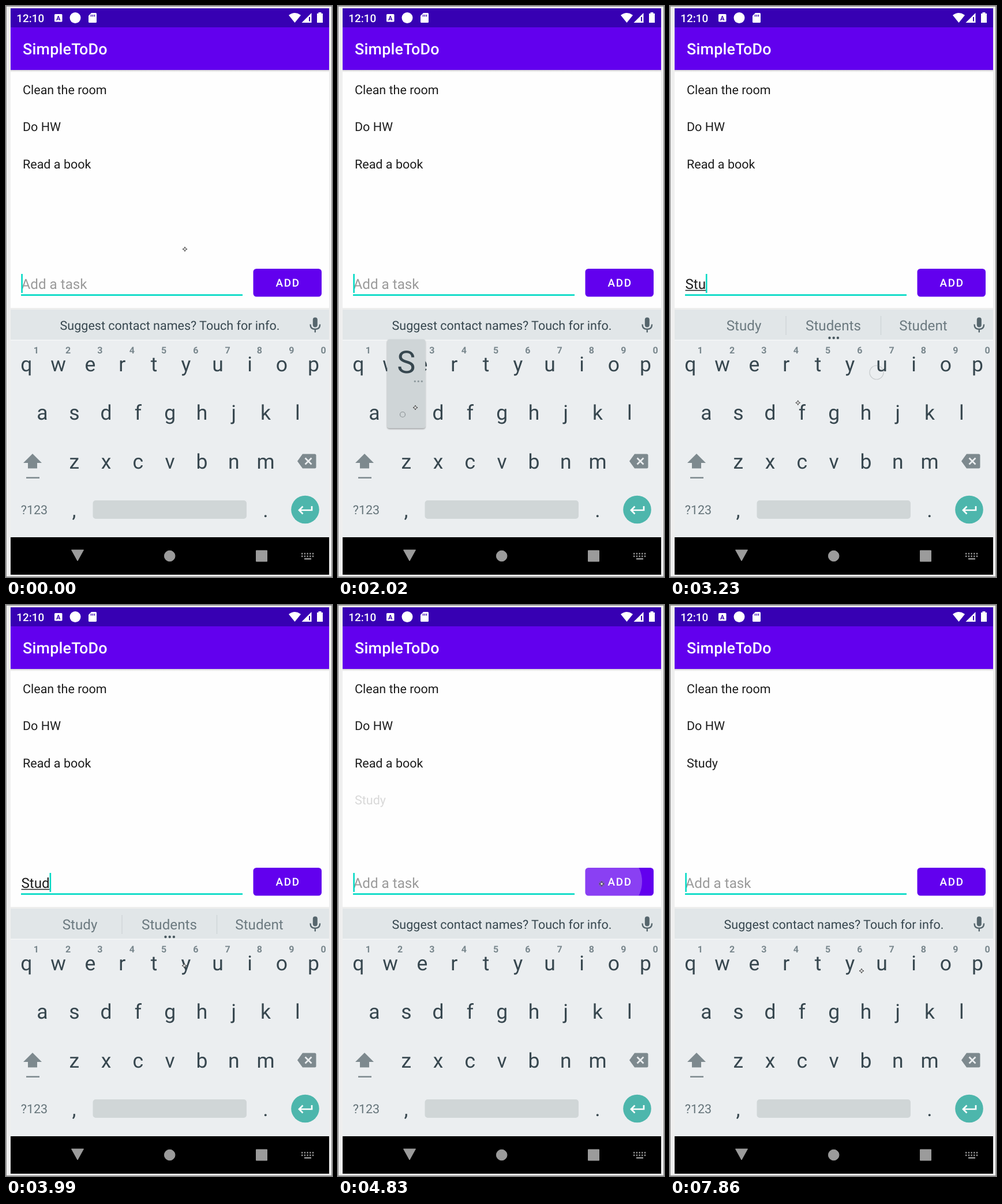
These frames come from a looping animation (565 px wide and 991 px high, 8000 ms). An HTML page:

```html
<!DOCTYPE html>
<html lang="en">
<head>
<meta charset="utf-8">
<title>To-do list</title>
<style>
  html, body { margin: 0; width: 100%; height: 100%; overflow: hidden; background: #efefef; }
  svg { display: block; width: 100vw; height: 100vh; font-family: Roboto, sans-serif; }
  text { text-rendering: geometricPrecision; }
  .mid { text-anchor: middle; }
  .item { font-size: 21.53px; fill: #1c1c1c; }
  .field { font-size: 24.2px; }
  .key { font-size: 35.5px; fill: #37474f; text-anchor: middle; }
  .hint { font-size: 16px; font-weight: 700; fill: #78868c; text-anchor: middle; }
  .word { font-size: 24.2px; fill: #6c7a80; text-anchor: middle; }
</style>
</head>
<body>
<svg viewBox="0 0 565 991">
  <defs>
    <linearGradient id="fade" x2="0" y2="1">
      <stop offset="0" stop-color="#d2d2d2"/><stop offset="1" stop-color="#fefefe"/>
    </linearGradient>
    <filter id="lift" x="-20%" y="-20%" width="140%" height="140%">
      <feDropShadow dx="0" dy="1.5" stdDeviation="1.3" flood-opacity=".4"/>
    </filter>
    <clipPath id="buttonClip"><rect x="428.5" y="456" width="118.5" height="48.5" rx="5.5"/></clipPath>
  </defs>

  <rect x=".5" y=".5" width="564" height="990" fill="#efefef" stroke="#8c8c8c"/>
  <rect x="8" y="4" width="552" height="983" fill="#fefefe"/>
  <rect x="8" y="4" width="552" height="33" fill="#3700b3"/>
  <rect x="8" y="37" width="552" height="74" fill="#6200ee"/>
  <rect x="8" y="111" width="552" height="4" fill="url(#fade)"/>

  <g fill="#fff">
    <text x="18.3" y="27.5" font-size="18.84" font-weight="500">12:10</text>
    <rect x="84" y="14" width="13.5" height="13.5" rx="1.5"/>
    <text class="mid" x="90.7" y="25" font-size="11" font-weight="700" fill="#3700b3">A</text>
    <circle cx="120" cy="20.5" r="9.5"/>
    <path d="M148 12h7.5q1.5 0 1.5 1.5v14q0 1.5-1.5 1.5h-11q-1.5 0-1.5-1.5v-10.5z"/>
    <path d="M147.5 15v3.5M150.5 15v3.5M153.5 15v3.5" stroke="#3700b3" stroke-width="1.4"/>
    <path d="M490 16Q500.5 8 511 16L500.5 29z"/>
    <path d="M512.5 29L529.5 12V29z"/>
    <path d="M526 19v7.5" stroke="#3700b3" stroke-width="2"/>
    <path d="M541.5 13v-2h5v2h2.5v16h-10v-16z"/>
    <text x="29" y="84" font-size="26.9" font-weight="500" letter-spacing=".2">SimpleToDo</text>
  </g>

  <g id="list"></g>

  <text id="hintText" class="field" x="26.5" y="491" fill="#9a9a9a">Add a task</text>
  <text id="typed" class="field" x="26.5" y="491" fill="#1c1c1c"></text>
  <rect id="underline" x="26.5" y="492.8" height="1.5" fill="#1c1c1c"/>
  <rect x="26" y="500.3" width="384" height="2.7" fill="#03dac5"/>
  <rect id="caret" y="465" width="2.6" height="33" fill="#03dac5"/>

  <rect x="428.5" y="456" width="118.5" height="48.5" rx="5.5" fill="#6200ee"/>
  <circle id="ripple" cx="473" cy="480" fill="#fff" clip-path="url(#buttonClip)"/>
  <text x="467.5" y="487.2" font-size="18.84" font-weight="500" letter-spacing="1.68" fill="#fff">ADD</text>

  <rect x="8" y="524" width="552" height="3" fill="#ededed"/>
  <rect x="8" y="527" width="552" height="53" fill="#e1e6e8"/>
  <rect x="8" y="580" width="552" height="342" fill="#ebeef0"/>
  <path d="M8 580H560" stroke="#f6f7f8" stroke-width="1.5"/>

  <text id="notice" class="mid" x="284" y="562" font-size="21.53" fill="#37474f">Suggest contact names? Touch for info.</text>
  <g id="words">
    <path d="M201 538v33M365.5 538v33" stroke="#ced5d8" stroke-width="1.3"/>
    <text class="word" x="128" y="563"></text>
    <text class="word" x="283" y="563"></text>
    <text class="word" x="439" y="563"></text>
    <path d="M276.5 576h15" stroke="#4a5960" stroke-width="4.4" stroke-linecap="round" stroke-dasharray="0 7.2"/>
  </g>
  <g fill="none" stroke="#56666d" stroke-width="2.4">
    <path d="M535.8 544.5v9" stroke-width="8" stroke-linecap="round"/>
    <path d="M527.5 552.5q0 8.5 8.3 8.5t8.3-8.5M535.8 561v5.5"/>
  </g>

  <g id="keys"></g>
  <g fill="#7d898e">
    <path d="M46 777l16 16h-8v9.5h-16v-9.5h-8zM35 817.500h23v2.500h-23z"/>
    <path d="M514 777.5h21q2.5 0 2.5 2.5v20q0 2.500-2.500 2.500h-21l-9-12.500z"/>
  </g>
  <path d="M518.5 784.5l11 11m0-11l-11 11" stroke="#ebeef0" stroke-width="2.8"/>
  <text class="mid" x="49" y="881.5" font-size="21.53" fill="#65747a">?123</text>
  <rect x="150.5" y="858" width="266.5" height="32" rx="5" fill="#d0d6d7"/>
  <circle cx="518.5" cy="874" r="24.3" fill="#4db6ac"/>
  <path d="M530 868v7h-22M514.5 868.5l-6.5 6.5 6.5 6.5" fill="none" stroke="#fff" stroke-width="2.7"/>

  <rect x="8" y="922" width="552" height="65" fill="#000"/>
  <g fill="#9b9b9b" stroke="#9b9b9b" stroke-linejoin="round">
    <path d="M113.500 944h21l-10.500 19z"/>
    <circle cx="283.7" cy="954.5" r="9.3"/>
    <rect x="433.500" y="945" width="19" height="19"/>
  </g>
  <path d="M512 950.5h22M512 955h22" stroke="#9b9b9b" stroke-width="2.4" stroke-dasharray="2.4 2.3"/>
  <path d="M517 959.5h12" stroke="#9b9b9b" stroke-width="2.4"/>

  <g id="popup">
    <rect x="-33" y="-128" width="66" height="154" rx="4" fill="#cfd5d7" filter="url(#lift)"/>
    <text class="mid" y="-69" font-size="54" fill="#37474f"></text>
    <path d="M15-55h13" stroke="#8e999d" stroke-width="3.4" stroke-linecap="round" stroke-dasharray="0 6"/>
  </g>
  <circle id="ring" fill="none" stroke="#6f767a" stroke-width="1.2"/>
  <path id="pointer" d="M0-4L1.300-1.300 4 0 1.300 1.300 0 4-1.300 1.300-4 0-1.300-1.300z" fill="#ddd" stroke="#333" stroke-width=".9"/>
</svg>
<script>
const LOOP = 8000, BEAT = 133, BLINK = 500, KEY_GAP = 55.3;
const $ = id => document.getElementById(id);
const set = (el, attrs) => { for (const k in attrs) el.setAttribute(k, attrs[k]); };
const show = (el, on) => set(el, { display: on ? 'inline' : 'none' });
const move = (el, x, y) => set(el, { transform: `translate(${x} ${y})` });
const clamp = v => Math.min(1, Math.max(0, v));
const ease = v => { const u = clamp(v); return u * u * (3 - 2 * u); };
const mix = (a, b, u) => a + (b - a) * u;

function addText(parent, text, x, y, cls) {
  const el = document.createElementNS('http://www.w3.org/2000/svg', 'text');
  set(el, { x, y, class: cls });
  el.textContent = text;
  parent.append(el);
  return el;
}

const keyPos = {};
['qwertyuiop', 'asdfghjkl', 'zxcvbnm'].forEach((letters, row) => {
  const y = 634 + row * 84.4;
  [...letters].forEach((c, i) => {
    const x = 284.2 + (i - (letters.length - 1) / 2) * KEY_GAP;
    keyPos[c] = [x, y - 12];
    addText($('keys'), c, x, y, 'key');
    if (row === 0) addText($('keys'), (i + 1) % 10, x + 17, 603, 'hint');
  });
});
addText($('keys'), ',', 118, 887, 'key');
addText($('keys'), '.', 450, 887, 'key');

const rowY = i => 152.5 + 64.5 * i;
const [, , book, study] = ['Clean the room', 'Do HW', 'Read a book', 'Study']
  .map((text, i) => addText($('list'), text, 29, rowY(i), 'item'));

// Pointer stops: beat of arrival, beat of departure, place, and what is pressed there.
const stops = [
  { from: 0, to: 3, x: 310, y: 422 },
  { from: 8, to: 10, x: 140, y: 780 },
  { from: 14, to: 14, x: 112, y: 709, press: 14, key: 'S' },
  { from: 18, to: 19, x: 253, y: 632, press: 19, key: 't' },
  { from: 22, to: 22, x: 358, y: 636, press: 22, key: 'u' },
  { from: 25, to: 27, x: 174, y: 707, press: 27, key: 'd' },
  { from: 30, to: 31, x: 309, y: 626, press: 31, key: 'y' },
  { from: 34, to: 36, x: 457, y: 484, press: 35 },
  { from: 39, to: 41, x: 386, y: 493 },
  { from: 47, to: 55, x: 118, y: 275, press: 51, hold: 4 },
  { from: 59, to: 61, x: 332, y: 635 }
];
const presses = stops.filter(s => s.press);
const keyPresses = presses.filter(s => s.key);
const [addPress, longPress] = presses.filter(s => !s.key).map(s => s.press);

function pointerAt(beat) {
  const i = stops.findLastIndex(s => s.from <= beat);
  const a = stops[i], b = stops[i + 1] || a;
  const u = ease((beat - a.to) / (b.from - a.to));
  return [mix(a.x, b.x, u), mix(a.y, b.y, u)];
}

function drawTouch(beat, touch) {
  const hold = touch?.hold || 1;
  const age = beat - touch?.press;
  show($('ring'), age <= hold + 1);
  show($('popup'), touch?.key && age <= 1);
  if (!touch) return;
  const spread = clamp(age - hold);
  set($('ring'), { cx: touch.x, cy: touch.y, r: mix(4.5, 12, spread), opacity: mix(.7, .3, spread) });
  if (!touch.key) return;
  move($('popup'), ...keyPos[touch.key.toLowerCase()]);
  $('popup').querySelector('text').textContent = touch.key;
}

const wordEls = $('words').querySelectorAll('text');

function drawField(t, beat, touch) {
  const typed = beat > addPress ? '' : keyPresses.filter(s => beat >= s.press + 2).map(s => s.key).join('');
  const words = typed.length < 3 ? ['Still', typed, 'Start'] : ['Study', 'Students', 'Student'];
  $('typed').textContent = typed;
  const width = typed ? $('typed').getComputedTextLength() : 0;
  set($('underline'), { width });
  set($('caret'), { x: 26.3 + width });
  const sinceTouch = t - (touch?.press || 0) * BEAT;
  show($('caret'), Math.floor(sinceTouch / BLINK) % 2 === 0);
  show($('hintText'), !typed);
  show($('notice'), !typed);
  show($('words'), typed);
  wordEls.forEach((el, i) => { el.textContent = words[i]; });
}

function drawList(beat) {
  const age = beat - addPress;
  set($('ripple'), { r: 54 * Math.max(0, age), opacity: .25 * clamp((4 - age) / 3) });
  set(book, { opacity: 1 - clamp(beat - longPress - 3.5) });
  set(study, { opacity: clamp(age - .84), y: rowY(3 - ease((beat - longPress - 5) / 3)) });
}

function render(t) {
  const beat = Math.floor(t / BEAT);
  const touch = presses.findLast(s => s.press <= beat);
  move($('pointer'), ...pointerAt(beat));
  drawTouch(beat, touch);
  drawField(t, beat, touch);
  drawList(beat);
}

const start = performance.now();
function tick() {
  render((performance.now() - start) % LOOP);
  requestAnimationFrame(tick);
}
tick();
</script>
</body>
</html>
```
